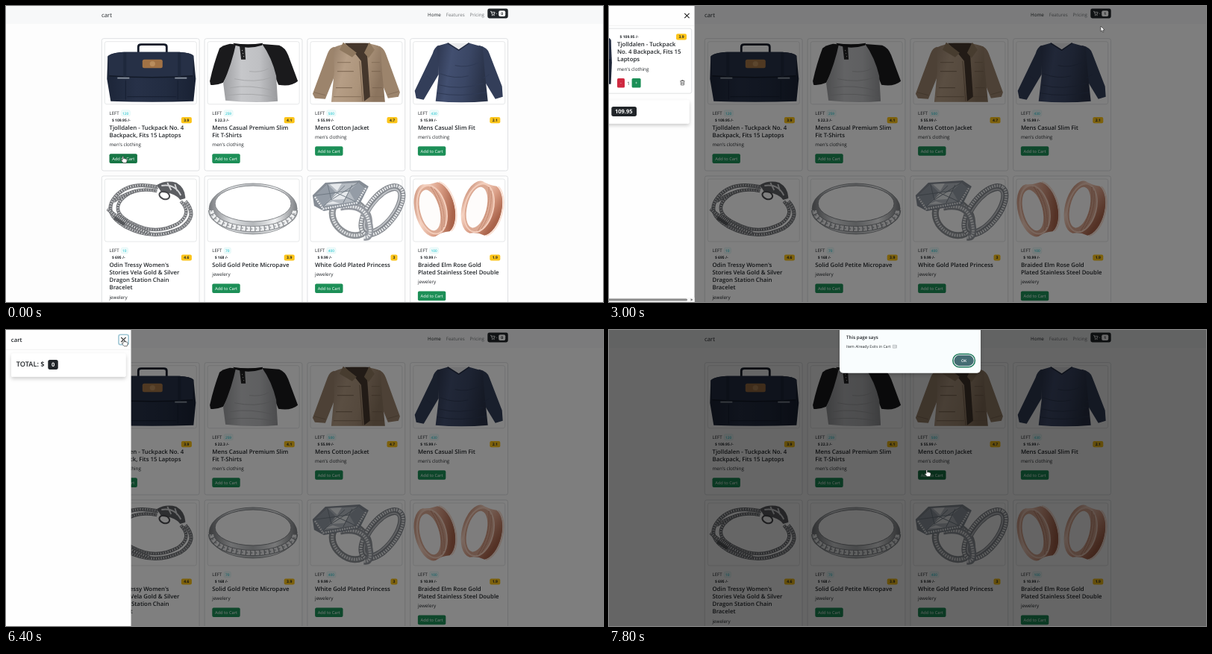
An HTML page for the animation above (8 s loop, 800 by 397 pixels).

```html
<!DOCTYPE html>
<html lang="en">
<head>
<meta charset="utf-8">
<title>cart</title>
<style>
html, body { margin: 0; width: 100%; height: 100%; overflow: hidden; background: #fdfdfd; }
svg { display: block; width: 100vw; height: 100vh; }
text { font-family: "Open Sans", "Noto Sans", sans-serif; fill: #212529; text-rendering: geometricPrecision; white-space: pre; }
</style>
</head>
<body>
<svg id="stage" viewBox="0 0 800 397" preserveAspectRatio="none"></svg>
<script>
const INK = '#212529', GREEN = '#1c8f57', DARK_GREEN = '#177645', LINE = '#dcdee0';

const text = (x, y, s, size, o = {}) =>
  `<text x="${x}" y="${y}" font-size="${size}" font-weight="${o.w || 400}" text-anchor="${o.a || 'start'}"` +
  `${o.f ? ` style="fill:${o.f}"` : ''}${o.id ? ` id="${o.id}"` : ''}>${s.replace(/&/g, '&amp;')}</text>`;
const box = (x, y, w, h, r, fill, extra = '') =>
  `<rect x="${x}" y="${y}" width="${w}" height="${h}" rx="${r}" fill="${fill}" ${extra}/>`;
const path = (d, fill, extra = '') => `<path d="${d}" fill="${fill}" ${extra}/>`;
const line = (d, color, w, dash = '') =>
  `<path d="${d}" fill="none" stroke="${color}" stroke-width="${w}" stroke-dasharray="${dash}"/>`;
const ring = (x, y, rx, ry, turn, color, w, dash = '') =>
  `<ellipse cx="${x}" cy="${y}" rx="${rx}" ry="${ry}" transform="rotate(${turn} ${x} ${y})" fill="none" ` +
  `stroke="${color}" stroke-width="${w}" stroke-dasharray="${dash}"/>`;
const gradient = (id, stops, slope = 0) =>
  `<linearGradient id="${id}" x2="1" y2="${slope}">` +
  stops.map((c, i) => `<stop offset="${i / (stops.length - 1)}" stop-color="${c}"/>`).join('') + '</linearGradient>';

const defs = '<defs>' +
  gradient('navy', ['#1c2538', '#273148', '#222c41', '#192133']) +
  gradient('heather', ['#9d9ea1', '#c6c7ca', '#bfc0c3', '#98999c']) +
  gradient('tan', ['#927b65', '#b69e86', '#ab937a', '#8b745e'], .3) +
  gradient('blue', ['#2b344c', '#424f70', '#3a4664', '#2a3349'], .2) +
  gradient('silver', ['#77797d', '#dfe1e3', '#b5b8bb', '#f1f2f3', '#7d8084']) +
  gradient('rose', ['#bb785e', '#f5d3c2', '#d99d85', '#a9634a'], .5) +
  '<filter id="soft" x="-20%" y="-40%" width="140%" height="200%"><feDropShadow dx="0" dy="2.5" stdDeviation="2.5" flood-opacity=".2"/></filter></defs>';

const backpack =
  line('M49 20 V11 Q49 8 53 8 H83 Q87 8 87 11 V20', '#141b29', 2.8) +
  path('M8 24 Q12 19 30 18 H104 Q120 19 123 23 L126 54 L123 84 Q68 86 12 84 L7 54Z', 'url(#navy)') +
  path('M8 24 Q12 19 30 18 H104 Q120 19 123 23 L122 50 Q68 54 10 50Z', '#263046') +
  line('M10 50 Q68 54 122 50', '#121927', 1.6) +
  line('M32 56 V82 M102 56 V82 M34 78 H100', '#161f30', .9) +
  line('M31 19 V51 M104 19 V51', '#1e283c', 4) +
  line('M21 53 H37 M98 53 H114', '#8e97a4', 1.7) +
  box(54.5, 28, 27, 11.5, 2.5, '#a17245') + '<circle cx="68" cy="33.8" r="3.6" fill="#b98d5d"/>';

const raglan =
  path('M34 7 Q24 9 20 13 Q12 34 7 57 L8 62 Q16 63 25 59 L40 30 L46 8Z', '#1a1a1c') +
  path('M74 7 L100 9 Q108 12 112 22 L125 57 Q116 65 99 62 L90 40Z', '#1a1a1c') +
  path('M42 7 Q58 13 77 7 Q90 25 96 50 L98 84 Q66 87 28 83 L25 60 Q37 32 42 7Z', 'url(#heather)') +
  path('M38 6 Q58 9 78 6 L77 9 Q58 15 41 9Z', '#161618') +
  path('M47 10 L54 11 L55 28 L49 28Z', '#202022') +
  line('M50 16h1 M51 20h1 M52 24h1', '#ddd', 1) +
  line('M34 66 Q60 61 94 70 M40 54 Q68 60 90 52 M30 76 Q64 72 96 79 M60 44 Q76 46 86 40', '#a4a5a8', .9);

const jacket =
  path('M36 11 Q30 12 27 20 L7 74 L10 80 L24 81 L38 46Z M96 10 Q102 12 105 20 L124 72 L122 78 L108 80 L94 46Z', '#9c846c') +
  path('M35 12 Q46 7 58 6 H78 Q92 8 98 11 L100 44 L104 85 H32 L36 44Z', 'url(#tan)') +
  path('M50 6 H82 L80 20 L84 78 L76 84 L72 30 L64 20Z', '#45372c') +
  path('M48 5 L43 15 L60 25 L66 19Z M83 5 L90 15 L82 26 L76 19Z', '#8f785f') +
  line('M70 30 L74 84 M40 44 H62 M86 44 H98 M38 66 H60 M87 66 H100', '#7b644f', 1) +
  line('M40 32 H58 M86 32 H97 M35 78 H72 M84 78 H103 M9 72 L24 76 M108 75 L122 71', '#826b56', .9);

const sweater =
  path('M38 9 Q32 12 30 20 L6 70 L8 80 L18 82 L38 48Z M92 9 Q104 12 106 20 L123 64 L124 78 L114 81 L94 48Z', '#333e59') +
  path('M36 10 L50 6 L65 15 L79 6 L97 11 L100 46 L104 84 Q68 87 34 84 L38 50Z', 'url(#blue)') +
  path('M52 6 L65 14 L77 6Z', '#e9eaec') + line('M50 6 L65 15.5 L79 6', '#262f46', 1.6) +
  line('M38 62 Q66 70 98 60 M36 73 Q66 79 102 72 M40 47 Q60 55 78 50 M60 36 Q76 40 92 32 M22 50 l8 6 M106 48 l-8 5', '#2f3a55', 1);

const strand = (d, w) => line(d, '#6d6f73', w) + line(d, '#cfd0d2', w * .55, '2 1.3') + line(d, '#3c3e42', .9, '1.5 1.7');
const chain =
  strand('M76 15 Q36 6 18 28 Q0 50 32 68 Q70 88 106 70 Q130 54 112 34', 5) +
  strand('M74 20 Q42 14 26 32 Q12 50 42 64 Q72 80 102 64 Q122 50 106 34', 4.5) +
  strand('M8 44 Q28 64 64 77', 5) + strand('M16 34 Q30 24 46 20', 4) +
  line('M18 54 L32 63', '#55575b', 9) + line('M19 52 L32 61', '#c5c6c8', 4, '1.2 1.2') +
  path('M74 12 Q86 5 100 9 Q112 16 112 30 L105 32 Q98 22 80 22Z', '#5c5e62') +
  line('M80 13 Q98 10 106 26 M88 9 l5 10 M98 11 l3 9', '#d5d6d8', 1.8) + ring(84, 26, 7, 5, 20, '#48494d', 2);

const band =
  path('M6 44 A59 34 0 0 1 124 44 A59 34 0 0 1 6 44 M14 37 A51 24 0 0 0 116 37 A51 24 0 0 0 14 37Z', 'url(#silver)', 'fill-rule="evenodd"') +
  line('M14 37 A51 24 0 0 1 116 37 M14 37 A51 24 0 0 0 116 37', '#85888c', 1) +
  line('M9 46 A56 25 0 0 0 121 46', '#8a8d91', 8.2) +
  line('M9 46 A56 25 0 0 0 121 46', '#eff0f1', 6.2, '5 1.3') +
  line('M9 46 A56 25 0 0 0 121 46', '#a6a9ad', 2.2, '1.8 4.5') +
  line('M6 44 A59 34 0 0 0 124 44 A59 34 0 0 0 6 44', '#7c7f83', .8);

const princess =
  ring(58, 56, 27, 21, 40, '#8d9196', 9) + ring(58, 56, 27, 21, 40, '#dcdee0', 4, '2 1.3') +
  ring(100, 46, 37, 17, -52, '#84888e', 10) + ring(100, 46, 39, 19, -52, '#e4e6e8', 4, '2 1.3') +
  ring(100, 46, 34, 14, -52, '#bfc2c6', 2) +
  line('M44 42 Q76 36 82 60 T76 82', '#9599a0', 9) + line('M44 42 Q76 36 82 60 T76 82', '#e6e8ea', 4, '2 1.3') +
  path('M7 26 L24 9 L70 6 L82 14 L70 38 L22 47 L9 40Z', '#858c95') +
  path('M11 26 L27 11 L68 9 L76 16 L64 34 L21 41Z', '#b4bac1') +
  path('M27 11 L38 22 L21 41 L11 26Z M68 9 L56 20 L64 34 L76 16Z', '#949ca6') +
  path('M38 22 L56 20 L50 31 L32 32Z M30 11 L46 10 L40 20Z M24 38 L34 34 L44 37Z', '#e6e9ec') +
  line('M11 26 L56 20 M21 41 L50 13 M38 22 L64 34 M27 11 L32 32 M68 9 L32 32 M48 36 L60 12', '#6d7680', .9) +
  line('M10 28 L21 44 L66 36 L79 15', '#e3e6e9', 2.6, '2 1.2');

const tunnel = (x, turn) => `<g transform="translate(${x} 44) rotate(${turn})">` +
  path('M-9 -36 Q0 -33 11 -34 A19 35 0 0 1 11 34 Q0 32 -9 36 A19 36 0 0 1 -9 -36Z', 'url(#rose)') +
  '<ellipse cx="-5" rx="19" ry="33" fill="#dcaa94"/><ellipse cx="-5" rx="19" ry="33" fill="none" stroke="#f3cdbb" stroke-width="2"/>' +
  line('M5 -26 Q14 0 5 26 M1 -30 Q11 0 1 30', '#b97a62', 1.4, '1 1') +
  '<ellipse cx="-8" rx="13" ry="28" fill="#fefcfb"/>' +
  line('M13 -34 A18 35 0 0 1 13 34', '#fae0d3', 2) + '</g>';
const roseGold = tunnel(34, -14) + tunnel(97, 14);

const wear = "men's clothing", gems = 'jewelery';
const items = [
  [backpack, '120', '109.95', '3.9', ['Tjolldalen - Tuckpack No. 4', 'Backpack, Fits 15 Laptops'], wear],
  [raglan, '259', '22.3', '4.1', ['Mens Casual Premium Slim', 'Fit T-Shirts'], wear],
  [jacket, '500', '55.99', '4.7', ['Mens Cotton Jacket'], wear],
  [sweater, '430', '15.99', '2.1', ['Mens Casual Slim Fit'], wear],
  [chain, '10', '695', '4.6', ["Odin Tressy Women's", 'Stories Vela Gold & Silver', 'Dragon Station Chain', 'Bracelet'], gems],
  [band, '70', '168', '3.9', ['Solid Gold Petite Micropave'], gems],
  [princess, '400', '9.99', '3', ['White Gold Plated Princess'], gems],
  [roseGold, '100', '10.99', '1.9', ['Braided Elm Rose Gold', 'Plated Stainless Steel Double'], gems]
];

const title = (x, y, rows) => rows.map((s, i) => text(x, y + i * 10.1, s, 7.8, { w: 600 })).join('');
const rating = (x, y, s) => {
  const w = s.length > 1 ? 14 : 9;
  return box(x - w, y, w, 8.2, 2, '#fcc419') + text(x - w / 2, y + 5.9, s, 5, { w: 700, a: 'middle' });
};

function card([pic, left, price, rate, rows, kind], i) {
  const x = 128.3 + i % 4 * 137.8, y = i < 4 ? 43.7 : 228;
  const end = 121.9 + (rows.length - 1) * 10.1;
  return `<g transform="translate(${x} ${y})">` +
    box(0, 0, 130.8, 177.3, 2.6, '#fff', `stroke="${LINE}" stroke-width=".9"`) +
    box(4, 4, 123, 84, 2.6, '#fff', `stroke="${LINE}" stroke-width=".7"`) + pic +
    text(10.2, 102.4, 'LEFT', 6.1) +
    box(26, 96, left.length * 2.8 + 3.6, 8, 2, '#effbfb', 'stroke="#d5f2f1" stroke-width=".5"') +
    text(27.8, 101.9, left, 4.8, { w: 600, f: '#3bcbd4' }) +
    text(13.6, 111.3, `$ ${price} /-`, 5, { w: 700 }) + rating(120.6, 105.4, rate) +
    title(10.2, 121.9, rows) + text(10.2, end + 12.4, kind, 6.3) +
    box(10.2, end + 22.6, 37.4, 12.6, 2, GREEN, `id="add${i}"`) +
    text(28.9, end + 31, 'Add to Cart', 5.7, { f: '#fff', a: 'middle' }) + '</g>';
}

const page = box(0, 0, 800, 397, 0, '#fdfdfd') + box(0, 0, 800, 24, 0, '#f7f8f9') +
  text(128, 15.2, 'cart', 7.8, { w: 500 }) +
  text(565, 14.4, 'Home', 6.3, { w: 500 }) +
  text(589.7, 14.4, 'Features', 6.2, { f: '#76797c' }) + text(621.5, 14.4, 'Pricing', 6.2, { f: '#76797c' }) +
  box(645.3, 3.6, 27.4, 12.9, 2.4, INK) +
  line('M649 7.3 h1.3 l1 3.8 h3 l.8 -2.8 h-4.4', '#fff', .8) +
  '<circle cx="651.6" cy="12.6" r=".7" fill="#fff"/><circle cx="654" cy="12.6" r=".7" fill="#fff"/>' +
  line('M656.8 10.2 h1.4', '#ccc', .8) +
  box(660.2, 6.2, 9, 7.8, 2, '#fff') + text(664.7, 12, '0', 5, { w: 700, a: 'middle', id: 'badge' }) +
  items.map(card).join('');

const drawer = '<g id="drawer">' + box(0, 0, 167.5, 397, 0, '#fefefe') + line('M167.3 0 V397', '#d0d0d0', .5) +
  text(6.8, 16, 'cart', 7.8, { w: 600 }) +
  box(151, 6.2, 13.2, 13.4, 2.4, '#fff', 'id="focus" stroke="#9fc6d4" stroke-width="1.6"') +
  line('M154.2 9.8 l6.4 6.4 m0 -6.4 l-6.4 6.4', '#222', 1.1) + line('M0 26.3 H167', '#ececec', .7) +
  '<g id="item">' + box(4, 30.2, 159.8, 87, 2.6, '#fff', `stroke="${LINE}" stroke-width=".9"`) +
  `<g transform="matrix(.437 0 0 .96 1.8 24)">${backpack}</g>` +
  text(67.6, 43.2, '$ 109.95 /-', 5, { w: 700 }) + rating(157, 37.2, '3.9') +
  title(64, 53.6, ['Tjolldalen - Tuckpack', 'No. 4 Backpack, Fits 15', 'Laptops']) + text(64, 86.5, wear, 6.3) +
  box(64, 97, 10, 12.6, 1.6, '#cf2a41') + text(69, 105, '-', 5.7, { f: '#fff', a: 'middle' }) +
  text(78.9, 105.6, '1', 6.1, { a: 'middle', id: 'count' }) +
  box(83.6, 97, 12, 12.6, 1.6, GREEN) + text(89.6, 105.2, '+', 5.7, { f: '#fff', a: 'middle' }) +
  line('M148.4 100.6 h6 M150.4 100.4 v-.9 h2 v.9 M149 100.8 l.4 5.2 h4 l.4 -5.2 M150.7 102 v2.8 M152.1 102 v2.8', '#444', .7) +
  box(0, 391, 167.5, 6, 0, '#f7f7f7') + box(8, 392.4, 150, 3.2, 1.6, '#8b8b8b') +
  path('M2 394 l3 -1.8 v3.6Z M165.6 394 l-3 -1.8 v3.6Z', '#777') + '</g>' +
  '<g id="total">' + box(7, 126.5, 153.6, 31.3, 2.6, '#fff', 'filter="url(#soft)"') +
  text(13.8, 144.4, 'TOTAL: $', 9.2, { w: 600 }) +
  box(56.3, 135, 33.6, 12.9, 2.6, INK, 'id="sumBox"') +
  text(61, 144.2, '109.95', 7.5, { w: 700, f: '#fff', id: 'sum' }) + '</g></g>';

const dialog = '<g id="dialog">' + box(309, -12, 189, 70.7, 5, '#f9fdfe', 'filter="url(#soft)"') +
  text(318, 13.4, 'This page says', 6.2, { w: 600 }) +
  text(318, 25.2, 'Item Already Exits in Cart', 5.1) +
  line('M380.4 21.2 h4 v4 h-4z M381.4 22.6 h2 M381.4 24 h2 M385.4 21 v4.4', '#8b8f92', .5) +
  box(460.8, 33.2, 29.6, 17.6, 8.8, '#fff', 'id="okRing" stroke="#1f7a5c" stroke-width="1.5"') +
  box(462.4, 34.8, 26.4, 14.4, 7.2, '#456c73', 'id="ok"') +
  text(475.6, 44, 'OK', 5, { w: 600, f: '#fff', a: 'middle' }) + '</g>';

const cursor = '<g id="cursor"><g stroke="#222" stroke-width=".6" stroke-linejoin="round">' +
  '<path id="arrow" fill="#fff" d="M0 0 V7.2 L1.7 5.7 L2.8 8.1 L4 7.6 L2.9 5.2 H5.1Z"/>' +
  '<path id="hand" fill="#fff" d="M0 1 Q.8 0 1.6 1 V4 L2.8 3.6 L4 4 L5.2 4.2 Q6.4 4.6 6.2 6 Q6 8 5.2 9.6 H1.2 Q-.2 8 -1.8 6 Q-1.4 4.8 0 6Z"/></g></g>';

const stage = document.getElementById('stage');
stage.innerHTML = defs + page + box(0, 0, 800, 397, 0, '#000', 'id="dim"') + drawer + dialog + cursor;
const $ = id => document.getElementById(id);
const show = (id, on) => $(id).setAttribute('display', on ? 'inline' : 'none');
const set = (id, key, value) => $(id).setAttribute(key, value);

const LOOP = 8000, STEP = 200;
const dims = [[0, 0], [1000, .6], [2000, 0], [3000, .5], [6600, .25], [6800, 0], [7800, .6]];
const slides = [[0, -175], [3000, -53], [3200, 0], [6600, -27], [6800, -175]];
const drops = [[0, null], [1000, 0], [2000, -2], [2200, null], [7800, -1]];
const badges = [[0, 0], [400, 1], [5800, 0], [7400, 1]];
const counts = [[0, 1], [4400, 2], [4800, 3], [5800, 0]];
const hands = [[0, 1], [1200, 0], [2600, 1], [3000, 0], [4200, 1], [5200, 0], [5600, 1], [6000, 0], [6400, 1], [6600, 0], [7000, 1]];
const moves = [[0, 156, 201], [600, 157, 202], [1000, 157.5, 203], [1800, 478, 40], [2000, 487, 39], [2600, 653, 9],
  [2800, 655, 10], [3000, 659, 27], [3200, 659, 27], [4200, 89, 101], [5000, 90, 102], [5400, 156.5, 96], [5600, 151, 100],
  [5800, 151, 101], [6400, 157, 12], [6600, 326, 95], [7000, 423, 184], [7400, 425, 187], [8000, 425, 187]];

const at = (table, t) => table.filter(k => k[0] <= t).pop()[1];
function place(t) {
  const i = moves.findIndex(m => m[0] > t), [t0, x0, y0] = moves[i - 1], [t1, x1, y1] = moves[i];
  const p = (t - t0) / (t1 - t0), e = p * p * (3 - 2 * p);
  return [x0 + (x1 - x0) * e, y0 + (y1 - y0) * e];
}

function draw(t) {
  const n = at(counts, t), drop = at(drops, t), hand = at(hands, t), leaving = drop === -2;
  const sum = String(+(n * 109.95).toFixed(2));
  set('dim', 'opacity', at(dims, t));
  set('drawer', 'transform', `translate(${at(slides, t)} 0)`);
  $('badge').textContent = at(badges, t);
  $('count').textContent = n;
  $('sum').textContent = sum;
  set('sumBox', 'width', 9.4 + 4.05 * sum.length);
  set('total', 'transform', `translate(0 ${n ? 0 : -95})`);
  show('item', n > 0);
  show('focus', t >= 6400);
  show('dialog', drop !== null);
  set('dialog', 'transform', `translate(0 ${drop || 0})`);
  set('dialog', 'opacity', leaving ? .94 : 1);
  show('okRing', !leaving);
  set('ok', 'fill', leaving ? '#5f8985' : '#456c73');
  set('add0', 'fill', t < 2600 ? DARK_GREEN : GREEN);
  set('add2', 'fill', t >= 7000 ? DARK_GREEN : GREEN);
  show('hand', hand);
  show('arrow', !hand);
  set('cursor', 'transform', `translate(${place(t)})`);
}

const start = performance.now();
function tick(now) {
  const t = Math.max(0, now - start) % LOOP;
  draw(Math.floor(t / STEP) * STEP);
  requestAnimationFrame(tick);
}
draw(0);
requestAnimationFrame(tick);
</script>
</body>
</html>
```
